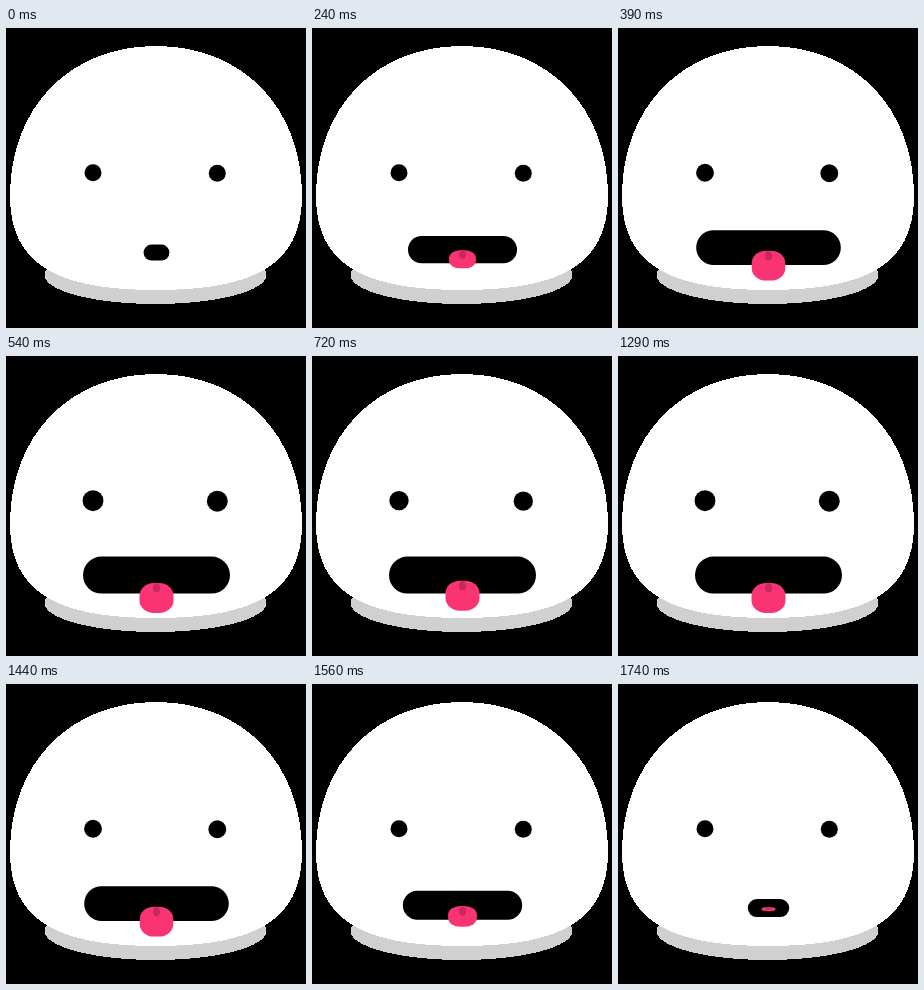
Recreate the animation shown at these times as an HTML page. Size 300 by 300 pixels, loop 1.77 s.

```html
<!DOCTYPE html>
<html lang="en">
<head>
<meta charset="utf-8">
<title>Round face</title>
<style>
  html, body { margin: 0; width: 100%; height: 100%; overflow: hidden; background: #000; }
  svg { display: block; width: 100vw; height: 100vh; }
  .hard { shape-rendering: crispEdges; }
</style>
</head>
<body>
<svg viewBox="0 0 300 300">
  <ellipse class="hard" cx="149.5" cy="247" rx="111" ry="29" fill="#d0d0d0"/>
  <path class="hard" fill="#fff" d="M4 168 C4 79 64 18 150 18 S296 79 296 168 C296 237 248 262 150 262 S4 237 4 168Z"/>
  <circle class="eye" cx="87" cy="144.7" r="8.5"/>
  <circle class="eye" cx="211.3" cy="145.2" r="8.5"/>
  <rect id="mouth"/>
  <rect id="tongue" fill="#fa3472"/>
  <rect id="crease" fill="#c9285c"/>
</svg>
<script>
  const LOOP = 1770, STEP = 30;
  const CLOSED_AT = 30;          // the cycle is mirrored around this moment
  const OPEN_MS = 408;
  const BOB_FROM = 276, BOB_MS = 564;

  const eyes = document.querySelectorAll('.eye');
  const [mouth, tongue, crease] = ['mouth', 'tongue', 'crease'].map(id => document.getElementById(id));
  const clamp = (v, lo, hi) => Math.min(hi, Math.max(lo, v));

  function setRect(el, cx, y, width, height, rx, ry) {
    const box = { x: cx - width / 2, y, width, height, rx, ry };
    for (const key in box) el.setAttribute(key, box[key].toFixed(2));
  }

  function draw(t) {
    const d = Math.abs(t - CLOSED_AT);
    const s = Math.min(d, LOOP - d);

    const u = clamp(s / OPEN_MS, 0, 1);
    const wide = Math.sin(u * Math.PI / 2);
    const tall = 0.7 * u + 0.3 * wide;
    const bob = Math.sin(Math.PI * clamp((s - BOB_FROM) / BOB_MS, 0, 1)) ** 2;

    eyes.forEach(eye => eye.setAttribute('r', (8.5 + 2.1 * bob).toFixed(2)));

    const mw = 10 + 137 * wide, mh = 14 + 23 * tall;
    const r = Math.min(mw, mh) / 2;
    setRect(mouth, 150.5, 218.1 - 17.5 * tall, mw, mh, r, r);

    const tw = 8 + 26 * wide;
    const th = clamp(35 * tall - 2, 0, 30);
    const ty = 223.5 - 2.3 * tall + 6.3 * bob;
    const shown = th < 2 ? 0 : th;
    setRect(tongue, 150.5, ty, tw, shown, tw * 0.42, th * 0.42);

    const ch = Math.min(9, shown * 0.45);
    setRect(crease, 150.5, ty + 0.5, 7, ch, 3.5, ch * 0.5);
  }

  const start = performance.now();
  function tick() {
    const t = (performance.now() - start) % LOOP;
    draw(Math.floor(t / STEP) * STEP);
    requestAnimationFrame(tick);
  }
  tick();
</script>
</body>
</html>
```
